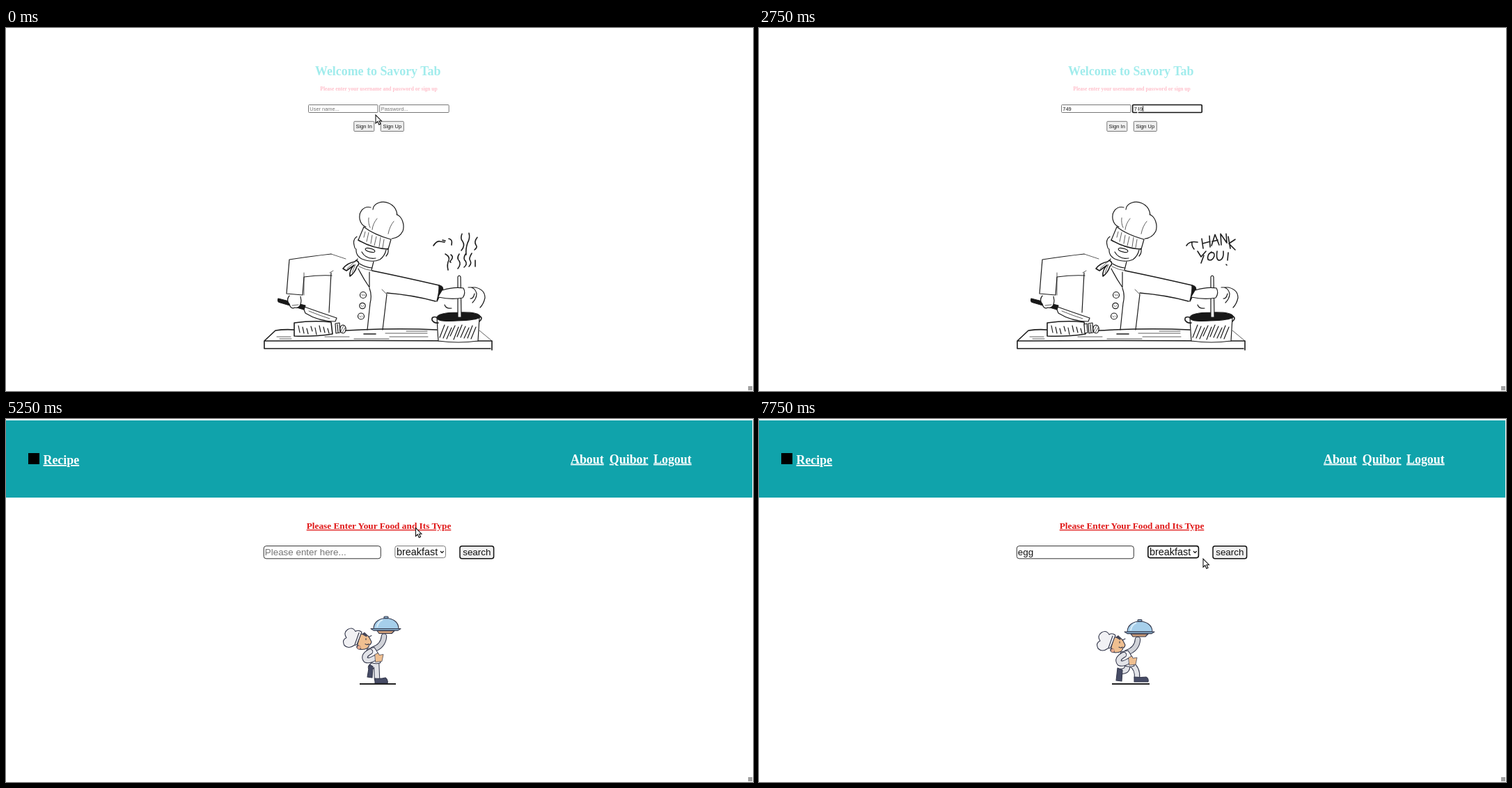
An HTML page that plays this animation: 1073x522 px, repeating every 8 s.

```html
<!DOCTYPE html>
<html lang="en">
<head>
<meta charset="utf-8">
<title>Welcome to Savory Tab</title>
<style>
html, body { margin: 0; width: 100%; height: 100%; overflow: hidden; background: #fff; }
svg { display: block; width: 100%; height: 100%; }
text { font-family: "Liberation Sans", Arial, sans-serif; white-space: pre; }
.serif { font-family: "Liberation Serif", Times, serif; font-weight: bold; }
.ui { font-family: "Open Sans", "Noto Sans", sans-serif; fill: #222; }
.mid { text-anchor: middle; }
.small { font-size: 7.45px; fill: #111; }
.big { font-size: 13.4px; fill: #111; }
.nav { font-size: 17.9px; fill: #fff; text-decoration: underline; }
.ink { fill: none; stroke: #1c1c1c; stroke-width: 1.2; stroke-linecap: round; stroke-linejoin: round; }
.white { fill: #fff; }
.black { fill: #181818; }
.thin { stroke-width: .7; }
.thick { stroke-width: 1.6; }
.field { fill: #fff; stroke: #777; }
.focus { stroke: #111; stroke-width: 1.6; }
.btn { fill: #efefef; stroke: #777; }
.hover { fill: #8fe3df; stroke: #1b3b3d; stroke-width: 1.6; }
.toon { fill: #f1f1f4; stroke: #33374b; stroke-width: 1.1; stroke-linejoin: round; stroke-linecap: round; }
.skin { fill: #efbf90; }
.boot { fill: #474c66; }
.edge, .sleeve { fill: none; stroke-linecap: round; stroke-linejoin: round; }
.edge { stroke: #33374b; stroke-width: 8.5; }
.sleeve { stroke: #e2e3e8; stroke-width: 6.4; }
.floor { stroke: #222; stroke-width: 2.2; }
</style>
</head>
<body>
<svg viewBox="0 0 1073 522" preserveAspectRatio="none">
<g id="login">
  <text class="serif" x="444" y="68" font-size="17.9" fill="#a1ecec">Welcome to Savory Tab</text>
  <text class="serif mid" x="535.5" y="90" font-size="7.5" fill="#ffc0cb">Please enter your username and password or sign up</text>
  <rect id="userBox" class="field" x="434.5" y="110.5" width="99.5" height="11" rx="1"/>
  <text id="user" class="small" x="436.3" y="118.6"></text>
  <rect id="passBox" class="field" x="536.7" y="110.5" width="99.5" height="11" rx="1"/>
  <text id="pass" class="small" x="538.7" y="118.6"></text>
  <rect id="signIn" class="btn" x="499.8" y="134.3" width="29" height="14.2" rx="1"/>
  <text id="signInText" class="small mid" x="514.2" y="143.9">Sign In</text>
  <rect class="btn" x="538.3" y="134.3" width="33" height="14.2" rx="1"/>
  <text class="small mid" x="554.8" y="143.9">Sign Up</text>

  <g class="ink">
    <!-- hat -->
    <path d="M517 286C508 283 505 270 511 262Q516 256 524 258M527 261C528 251 541 248 550 252Q561 257 562 269M561 268C569 271 573 283 570 292Q565 302 554 303"/>
    <path d="M514 286Q528 297 553 304L549 318M514 286L506 305"/>
    <path class="thick" d="M506 305Q526 317 549 318"/>
    <path class="thin" d="M521 273Q520 281 523 287M533 274Q527 281 526 290M557 278Q551 285 549 296M516 293l-2 8M521 294l-3 13M526 298l-2 12M532 300l-3 13M538 301l-2 14M543 304l-2 12"/>
    <!-- face -->
    <path d="M504 300Q498 304 500 312Q501 318 503 318Q502 327 511 332Q526 338 537 333Q544 328 546 319M548 317Q551 322 546 328M511 322Q517 333 531 331"/>
    <ellipse cx="523" cy="319.5" rx="7" ry="2.5" transform="rotate(15 523 319.5)"/>
    <path d="M505 332l-3 5M528 336L525 348M508 339Q516 344 526 345"/>
    <path class="thin" d="M507 343Q517 348 526 349"/>
    <!-- scarf -->
    <path class="white thick" d="M501 336Q490 338 484 346L489 349L500 341Q493 348 494 357Q501 352 504 343Q510 338 503 334Z"/>
    <path class="thin" d="M490 346l9-8M497 352l5-12"/>
    <!-- jacket -->
    <path d="M407 333Q440 328 467 325M407 333Q405 356 403 382L426 384L428 358Q450 355 468 356M467 352L464 409M506 346Q513 360 522 373V351M522 374Q526 384 523 396L519 434M547 383L541 434"/>
    <path class="thin" d="M467 325L488 332M465 352l5-3M428 352V384M540 376l7 7"/>
    <circle cx="513" cy="384" r="4.5"/><circle cx="512" cy="399.5" r="4.2"/><circle cx="510" cy="414.5" r="4.5"/>
    <path class="thin" d="M511 383l2 2M514 383l1 2M510 399l2 2M513 399l1 1M508 414l2 2M511 414l1 1"/>
    <!-- table -->
    <path class="thick" d="M387 435L371 450V461H696M371 450Q500 449 698 450V463M387 435Q400 433 414 434M488 435Q560 431 619 434"/>
    <path class="thin" d="M680 435L698 450M389 444h20M393 447h17M458 444h35M500 447h50M551 444h55M545 439h60M575 436h30"/>
    <path class="thick" d="M514 440h17"/>
    <!-- pot -->
    <path class="white" d="M619 416Q620 438 621 450Q650 454 678 450Q679 434 680 416"/>
    <path class="black" d="M619 417Q619 409 650 409Q682 408 681 416Q676 420 648 421Q621 423 619 417Z"/>
    <path class="thick" d="M619 416Q611 414 612 420Q615 425 621 424M680 414Q686 417 680 422"/>
    <path id="potHatch"/>
  </g>

  <g id="poseUp" class="ink">
    <path class="thick" d="M526 349Q570 358 622 370M617 393Q584 384 547 381"/>
    <path class="thick black" d="M622 370Q629 372 627 377L619 393Q623 378 622 370Z"/>
    <path class="white" d="M649 358Q651 354 653 358L654 416H649Z"/>
    <path class="white" d="M627 377Q643 372 657 374Q661 381 656 388Q640 391 621 387"/>
    <path d="M668 373Q674 374 676 382Q676 389 670 395M664 373h10Q688 376 688 388Q686 397 681 402M673 382Q671 390 667 389M630 398Q632 404 640 403"/>
    <path class="thick white" d="M414 424Q442 420 467 423L469 440Q443 444 414 443Z"/>
    <path class="loaf"/>
    <path class="white" d="M473 425l6-1l1 14l-6 1ZM476 426l1 12"/>
    <path id="slice" class="white" d="M467 426l4-1l1 13l-4 1Z"/>
    <ellipse cx="484" cy="433" rx="4.2" ry="6"/><path class="thin" d="M481 436l4-8M483 438l4-7"/>
    <path class="white" d="M426 400Q451 409 475 417L473 422Q449 422 430 410Z"/>
    <path class="thin" d="M435 407Q452 414 465 418"/>
    <path class="black" d="M391 389Q389 394 394 395L428 405L430 399Z"/>
    <path class="white" d="M407 385Q402 391 407 397Q409 405 415 402Q423 404 424 392L423 386"/>
    <path class="thin" d="M411 399l9-1"/>
  </g>
  <g id="poseDown" class="ink">
    <path class="thick" d="M526 349Q555 348 577 350Q600 358 621 369M616 392Q590 379 573 371Q558 376 547 380"/>
    <path class="white" d="M638 358Q640 354 643 358L643 417H638Z"/>
    <path class="white" d="M621 374Q638 371 648 373Q651 382 647 388Q634 391 618 388"/>
    <path class="thick" d="M618 368l5 3l-6 21l-3-2"/>
    <path stroke-dasharray="13 6" d="M651 373Q682 369 685 382Q685 401 650 403Q628 403 625 394"/>
    <path d="M655 378h10M653 396h15M627 398l8-5"/>
    <path class="thick white" d="M414 424Q442 420 470 423L474 431V440Q443 444 414 443Z"/>
    <path class="loaf"/>
    <ellipse cx="484" cy="433" rx="4.2" ry="6"/><path class="thin" d="M481 436l4-8"/>
    <path class="white" d="M426 400Q457 417 481 429L473 431Q444 421 430 407Z"/>
    <path d="M478 401Q487 405 494 413M474 408Q485 412 490 419M497 432l-2 7M502 429l-2 16"/>
    <path class="black" d="M397 383Q393 387 397 390L427 406L431 399Z"/>
    <path class="white" d="M407 385Q402 391 406 398Q409 406 415 402Q423 404 424 392L423 386"/>
    <path class="thin" d="M411 399l9-1"/>
  </g>
  <g class="ink">
    <path id="steam" class="thick" d="M614 313Q619 305 624 307L630 308M627 305l4 1M636 303Q642 304 640 312M655 296Q652 303 656 307Q660 313 654 320M665 295Q667 302 663 309Q660 318 661 326M677 301Q672 307 675 312Q678 315 673 319M631 325Q638 329 636 334Q633 340 635 348M639 326Q643 329 640 333Q636 337 639 337M651 325Q647 331 651 335Q654 340 649 346M660 325Q656 332 660 335Q663 340 658 344M669 324Q664 332 667 335Q669 339 665 343M674 334v9"/>
    <path id="thanks" class="thick" d="M614 313Q618 306 630 308M622 308Q621 313 625 318M636 303l2 14M647 299l1 16M637 310l11-3M650 313l5-16l6 15M651 307l8-2M664 312l-1-16l9 13l-1-13M674 300l3 17M684 304l-9 6l9 9M630 321l5 8l7-8M639 327l-4 11M650 322Q643 326 645 333Q651 336 654 328Q655 322 649 323M658 321Q656 335 662 334Q668 332 667 321M674 323l-1 11M671 340l1 1"/>
    <path id="wisps" class="thick" d="M614 311Q620 306 627 308Q637 307 634 319M652 302Q657 299 661 303M654 309Q658 314 656 319Q653 322 653 327M670 312Q677 312 676 318L673 325M631 328Q635 330 633 336Q632 341 634 346M650 343Q649 348 653 352M670 346Q673 351 669 357L668 364"/>
  </g>
</g>

<g id="search">
  <rect x="0" y="2" width="1072" height="111" fill="#10a3ab"/>
  <rect x="32" y="49" width="16" height="16"/>
  <text class="serif nav" x="53.5" y="65">Recipe</text>
  <text class="serif nav" x="811" y="63.6">About</text>
  <text class="serif nav" x="866.8" y="63.6">Quibor</text>
  <text class="serif nav" x="930" y="63.6">Logout</text>
  <text class="serif mid" x="535.5" y="158" font-size="13.3" fill="#e01818" text-decoration="underline">Please Enter Your Food and Its Type</text>
  <rect id="foodBox" class="field" x="370.3" y="182.6" width="168" height="18.2" rx="3.5" style="stroke:#333"/>
  <text id="food" class="big" x="371.8" y="196.3"></text>
  <rect id="typeBox" class="field" x="558.8" y="182.6" width="72.6" height="17" rx="3"/>
  <text class="big" x="561" y="196" style="font-size:14.4px">breakfast</text>
  <path d="M624 190l2.3 2.4l2.3-2.4" fill="none" stroke="#111" stroke-width="1.3"/>
  <rect x="652" y="182.7" width="48.6" height="18" rx="3" fill="#efefef" stroke="#111" stroke-width="1.5"/>
  <text class="big mid" x="676.3" y="196.2">search</text>

  <g id="legs0">
    <path class="edge" d="M530 355Q528 365 517 366M535 354Q547 361 551 372"/>
    <path class="sleeve" d="M530 355Q528 365 517 366M535 354Q547 361 551 372"/>
    <path class="toon boot" d="M510 363l9-1l1 18h-8ZM547 373Q557 371 563 368Q567 370 565 374Q557 378 549 378Z"/>
    <path class="floor" d="M501 381h66"/>
  </g>
  <g id="legs1">
    <path class="edge" d="M529 356Q529 363 519 363M535 353Q544 359 543 372"/>
    <path class="sleeve" d="M529 356Q529 363 519 363M535 353Q544 359 543 372"/>
    <path class="toon boot" d="M515 358l7 3l-1 16l-8-1ZM539 371q9 1 17 0q4 2 3 7h-20Z"/>
    <path class="floor" d="M507 381h54"/>
  </g>
  <g id="legs2">
    <path class="edge" d="M532 350l1 24M529 352l-5 5"/>
    <path class="sleeve" d="M532 350l1 24M529 352l-5 5"/>
    <path class="toon boot" d="M522 353l5 3l-1 16l-7-1ZM530 373q8 1 15-1q4 3 3 8h-18Z"/>
    <path class="floor" d="M508 381h52"/>
  </g>
  <g id="waiter">
    <path class="edge" d="M527 336Q542 331 543 317"/>
    <path class="sleeve" style="stroke:#d0d2d8" d="M527 336Q542 331 543 317"/>
    <path class="toon skin" style="fill:#c99b78" d="M533 309h25l-4 4h-18Z"/>
    <path class="toon" style="fill:#a6cfeb" d="M528 306C528 286 564 286 564 306Z"/>
    <path d="M533 304Q534 296 541 293" fill="none" stroke="#d9edf9" stroke-width="2"/>
    <rect class="toon" style="fill:#8db5d3" x="543" y="288.5" width="6" height="2.6" rx="1"/>
    <path class="toon" style="fill:#8db5d3" d="M524 306h43l-4 2.6h-35Z"/>
    <path class="toon" d="M519 335L529 333Q537 343 538 355Q531 358 522 354Q514 345 519 335Z"/>
    <path class="toon skin" d="M509 314Q518 312 522 319L525 325Q524 329 522 329Q521 336 511 336Q504 335 505 328Z"/>
    <path d="M511 314l4-3l4 4l-1 3ZM505 329l4 2l1 5q-6 1-7-4Z" fill="#464657"/>
    <path class="toon" style="fill:none" d="M516 328q3 2 5 0M517 320v2M521 318l4-2"/>
    <circle cx="507" cy="333" r="2.4" fill="#e8a98c"/>
    <path class="toon" d="M511 311Q506 307 502 310Q498 303 491 307Q484 312 489 319Q482 322 486 330Q492 336 500 330L504 329Z"/>
    <path class="toon" style="fill:none" d="M507 312l-6 17"/>
    <path class="edge" d="M523 339Q512 345 517 351Q522 353 530 348"/>
    <path class="sleeve" d="M523 339Q512 345 517 351Q522 353 530 348"/>
    <path class="toon skin" style="stroke-width:.7" d="M530 343l5-2l1 3l6-1l-2 10l-9 1Z"/>
  </g>
</g>

<g id="dialog">
  <rect x="408" y="-6" width="255" height="76.6" rx="3" fill="#000" opacity=".16"/>
  <rect x="409" y="-6" width="252.6" height="75" rx="2" fill="#fff" stroke="#aaa" stroke-width=".9"/>
  <text class="ui" x="418" y="14" font-size="7.95">localhost:3000 web sitesinin mesajı</text>
  <text class="ui" x="418" y="30.2" font-size="7.1">Welcome to Savory Tab :)</text>
  <rect id="ring" x="611.6" y="41.4" width="41" height="18.4" rx="2.5" fill="#fff" stroke="#174ea6" stroke-width="1.4"/>
  <rect x="613" y="42.8" width="38.2" height="15.6" rx="1.5" fill="#1a73e8"/>
  <text class="ui mid" x="632" y="53.2" font-size="6.9" font-weight="600" style="fill:#fff">Tamam</text>
</g>
<rect x="1066" y="515" width="6" height="6" fill="#a2a2a2"/>
<path id="caret" stroke="#111" stroke-width=".9"/>
<path id="arrow" d="M0 0V12L2.8 9.5L4.8 14L7 13L5 8.7H8.4Z" fill="#fff" stroke="#111" stroke-width="1.1"/>
<path id="beam" d="M0 -5V5" stroke="#fff" stroke-width="1.4"/>
</svg>
<script>
const $ = id => document.getElementById(id);
const LOOP = 8000, STEP = 250;
const show = (id, on) => $(id).style.display = on ? '' : 'none';
const move = (id, x, y) => $(id).setAttribute('transform', `translate(${x} ${y})`);
const within = (s, a, b) => s >= a && s <= b;

const hatch = (count, x, y, gap, dx, dy) => Array.from({ length: count }, (_, i) =>
  `M${x + i * gap} ${y + (i * 7) % 5}l${dx} ${dy - (i * 5) % 4}`).join('');
$('potHatch').setAttribute('d', hatch(10, 630, 427, 5, -7, 18));
document.querySelectorAll('.loaf').forEach(p => p.setAttribute('d', hatch(8, 420, 428, 6, 2, 10)));

// step, x, y of the pointer
const route = [[0, 531, 125], [2, 490, 117], [5, 490, 117], [7, 552, 117], [11, 544, 118],
  [13, 515, 141], [14, 515, 141], [16, 632, 53], [17, 632, 53], [18, 677, 119],
  [20, 677, 121], [22, 500, 192], [25, 493, 199], [27, 493, 199], [29, 610, 190], [31, 638, 201]];

function pointerAt(s) {
  const i = Math.max(1, route.findIndex(p => p[0] >= s));
  const [a, b] = [route[i - 1], route[i]];
  const k = (s - a[0]) / (b[0] - a[0]);
  return [a[1] + (b[1] - a[1]) * k, a[2] + (b[2] - a[2]) * k];
}

function type(id, word, count, hint) {
  const typed = word.slice(0, Math.max(0, count));
  $(id).textContent = typed || hint;
  $(id).style.fill = typed ? '' : '#757575';
}

function caretAfter(id, typed, height, y) {
  const x = +$(id).getAttribute('x') + (typed > 0 ? $(id).getComputedTextLength() : 0);
  $('caret').setAttribute('d', `M${x + .5} ${y}v${height}`);
}

function draw(s) {
  const first = s < 18;
  show('login', first);
  show('search', !first);

  const onUser = within(s, 2, 7), onPass = within(s, 8, 12), onFood = within(s, 22, 28);
  type('user', '749', s - 3, 'User name...');
  type('pass', '749', s - 8, 'Password...');
  type('food', 'egg', s - 24, 'Please enter here...');
  $('userBox').classList.toggle('focus', onUser);
  $('passBox').classList.toggle('focus', onPass);
  $('foodBox').classList.toggle('focus', onFood);
  $('typeBox').classList.toggle('focus', s >= 29);
  $('signIn').classList.toggle('hover', s >= 13);
  $('signInText').style.fill = s >= 13 ? '#c9f6f4' : '';
  show('caret', onUser || onPass || onFood);
  if (onUser) caretAfter('user', s - 3, 8, 112);
  if (onPass) caretAfter('pass', s - 8, 8, 112);
  if (onFood) caretAfter('food', s - 24, 14, 184.5);

  // sketch: stir, greet, chop, stir, chop
  const pose = s % 5, down = pose === 2 || pose === 4;
  show('poseUp', !down);
  show('poseDown', down);
  show('wisps', down);
  show('thanks', pose === 1);
  show('slice', pose === 1);
  show('steam', pose === 0 || pose === 3);

  // walk: contact, dip, lift, lift
  const walk = [0, 1, 2, 2][(s + 2) % 4];
  for (let i = 0; i < 3; i++) show('legs' + i, i === walk);
  move('waiter', walk === 1 ? 1 : 0, walk === 2 ? -4.5 : 0);

  show('dialog', within(s, 14, 18));
  show('ring', first);
  move('dialog', 0, first ? 0 : -8);
  $('dialog').setAttribute('opacity', first ? 1 : .27);

  const beam = within(s, 2, 12) || within(s, 22, 28);
  show('beam', beam);
  show('arrow', !beam);
  move(beam ? 'beam' : 'arrow', ...pointerAt(s));
}

function frame() {
  draw(Math.floor(performance.now() % LOOP / STEP));
  requestAnimationFrame(frame);
}
frame();
</script>
</body>
</html>
```
